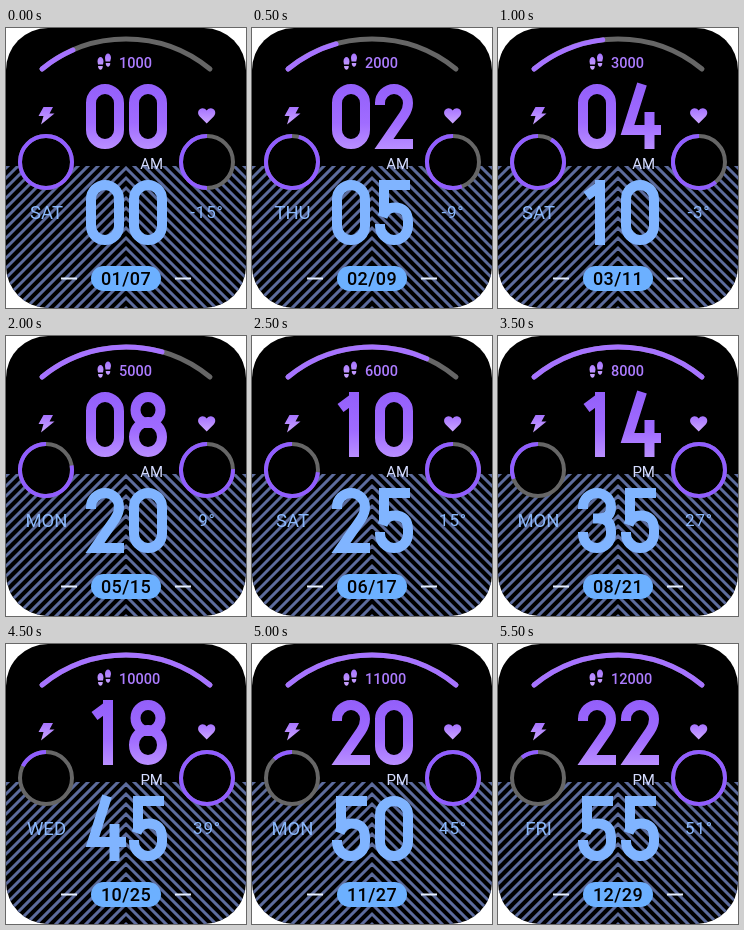
An HTML page that plays this animation: 240 by 280 pixels, repeating every 6000 ms.

```html
<!DOCTYPE html>
<html lang="en">
<head>
<meta charset="utf-8">
<title>Watch face</title>
<style>
  html, body { margin: 0; width: 100%; height: 100%; overflow: hidden; background: #fff; }
  svg { display: block; width: 100vw; height: 100vh; }
  text { font-family: Roboto, "Open Sans", sans-serif; text-anchor: middle; fill: #8bb8fb; }
  .ring, .goal { fill: none; stroke: #905dff; stroke-width: 4; }
  .goal { stroke: #a673ff; stroke-width: 5; stroke-linecap: round; }
  .track { stroke: #666; }
  .big { fill: none; stroke-width: 10; }
</style>
</head>
<body>
<svg viewBox="0 0 240 280" preserveAspectRatio="none">
  <defs>
    <clipPath id="face"><rect width="240" height="280" rx="42"/></clipPath>
    <clipPath id="floor"><rect y="138" width="240" height="142"/></clipPath>
    <linearGradient id="violet" gradientUnits="userSpaceOnUse" x1="0" y1="0" x2="0" y2="65">
      <stop offset="0" stop-color="#935ffa"/>
      <stop offset=".6" stop-color="#a06cff"/>
      <stop offset="1" stop-color="#b98fff"/>
    </linearGradient>
    <linearGradient id="icon" x1="0" y1="0" x2="0" y2="1">
      <stop offset="0" stop-color="#a673ff"/>
      <stop offset="1" stop-color="#cba6ff"/>
    </linearGradient>
  </defs>
  <g clip-path="url(#face)">
    <rect width="240" height="280"/>
    <path id="stripes" clip-path="url(#floor)" fill="none" stroke="#5d6c9c" stroke-width="3"/>

    <path id="goalTrack" class="goal track"/>
    <path id="goal" class="goal"/>

    <g fill="url(#icon)">
      <path d="M37.500 79h9.500l-3.500 6.500h5l-13.500 11 2.500-8.500h-5z"/>
      <path d="M200.700 95.500l-7-7c-5-6 3-11.500 7-6 4-5.500 12 0 7 6z"/>
      <path d="M91.500 33.500c0-6 6-6 6 0l-.5 3h-5zM92 38h4.800c0 5-4.500 5-4.800 0zM99 30c0-6 6-6 6 0l-.8 3.500h-4.700zM99.700 35h4.600c0 5-4.500 5-4.600 0z"/>
    </g>

    <circle class="ring track" cx="40" cy="134" r="26" style="fill:#000"/>
    <circle class="ring track" cx="201" cy="134" r="26" style="fill:#000"/>
    <path id="battery" class="ring"/>
    <path id="heart" class="ring"/>

    <path id="hour" class="big" stroke="url(#violet)" transform="translate(80 56)"/>
    <path id="minute" class="big" stroke="#80b4ff" transform="translate(80 152)"/>

    <text id="steps" x="113" y="39.500" font-size="14.500" font-weight="500" style="text-anchor:start;fill:#ac7cff"></text>
    <text id="half" x="145.700" y="141" font-size="15" style="fill:#d5dcff"></text>
    <text id="day" x="40.500" y="191" font-size="18.500"></text>
    <text id="temp" x="201" y="190" font-size="17" letter-spacing=".8"></text>

    <rect x="85" y="238" width="70" height="25" rx="12.500" fill="#6cb0ff"/>
    <text id="date" x="120" y="257" font-size="18" font-weight="500" letter-spacing=".4" style="fill:#000"></text>
    <path d="M55 250.500h16M169 250.500h16" stroke="#e6efff" stroke-width="2"/>
  </g>
</svg>
<script>
const STEP = 500, COUNT = 12;
const $ = id => document.getElementById(id);
const pad = n => String(n).padStart(2, '0');

// Levels per step; the last value holds.
const goalLevel = [.2, .3, .416, .58, .7, .81, 1];
const heartGap = [180, 160, 140, 117, 88, 45, 45, 0];
const batteryGap = [0, 15, 30, 55, 80, 95, 180, 250, 275, 297, 317, 322];
const days = ['SUN', 'MON', 'TUE', 'WED', 'THU', 'FRI', 'SAT'];

const loop = (cx, cy, rx, ry) =>
  `M${cx - rx} ${cy}a${rx} ${ry} 0 0 1 ${2 * rx} 0a${rx} ${ry} 0 0 1 ${-2 * rx} 0z`;
const bowl = 'V46a14 14 0 0 1-28 0V44';
const cap = 'M5 21V19a14 14 0 0 1 28 0';
const glyphs = {
  0: 'M5 19a14 14 0 0 1 28 0V46a14 14 0 0 1-28 0z',
  1: 'M22 65V0M8.500 16L22 6',
  2: cap + 'q0 6-4 12L9 60H38',
  3: cap + 'q0 11.500-12 11.500H15H21q12 0 12 13' + bowl,
  4: 'M21 0L6.500 46H40M28.500 28V65',
  5: 'M35 5H9V35M7.500 37Q11 27.500 19.500 27.500Q33 27.500 33 42' + bowl,
  6: 'M23.500 0L7.500 37' + loop(19, 45, 14, 15),
  8: loop(19, 18, 12.5, 13) + loop(19, 45, 14, 15)
};

// Shifts absolute coordinates of a glyph by dx.
function shift(d, dx) {
  return d.replace(/([MLHQ])([^A-Za-z]*)/g, (_, c, args) => {
    const nums = args.match(/-?[\d.]+/g).map(Number);
    return c + nums.map((n, k) => k % 2 ? n : n + dx).join(' ');
  });
}
const number = n => [...pad(n)].map((c, k) => shift(glyphs[c], k * 43)).join('');

// Arc between two clockwise angles measured from the top.
function arc(cx, cy, r, from, to) {
  const at = a => {
    const q = a * Math.PI / 180;
    return `${(cx + r * Math.sin(q)).toFixed(2)} ${(cy - r * Math.cos(q)).toFixed(2)}`;
  };
  const mid = (from + to) / 2;
  return `M${at(from)}A${r} ${r} 0 0 1 ${at(mid)}A${r} ${r} 0 0 1 ${at(to)}`;
}
const goalArc = v => arc(120, 143.6, 132.6, -39.3, -39.3 + 78.6 * v);
const hold = (list, i) => list[Math.min(i, list.length - 1)];

function show(i) {
  const month = i + 1, date = 7 + 2 * i;
  $('goal').setAttribute('d', goalArc(hold(goalLevel, i)));
  $('battery').setAttribute('d', arc(40, 134, 26, batteryGap[i], 360));
  $('heart').setAttribute('d', arc(201, 134, 26, hold(heartGap, i), 360));
  $('hour').setAttribute('d', number(2 * i));
  $('minute').setAttribute('d', number(5 * i));
  $('steps').textContent = 1000 * month;
  $('half').textContent = i < 6 ? 'AM' : 'PM';
  $('day').textContent = days[new Date(2023, i, date).getDay()];
  $('temp').textContent = `${6 * i - 15}°`;
  $('date').textContent = `${pad(month)}/${pad(date)}`;
}

let chevrons = '';
for (let y = 0; y < 290; y += 10) chevrons += `M-10 ${y + 130}L120 ${y}L250 ${y + 130}`;
$('stripes').setAttribute('d', chevrons);
$('goalTrack').setAttribute('d', goalArc(1));

let last = -1;
const start = performance.now();
function tick() {
  const i = Math.floor((performance.now() - start) / STEP) % COUNT;
  if (i !== last) show(last = i);
  requestAnimationFrame(tick);
}
tick();
</script>
</body>
</html>
```
